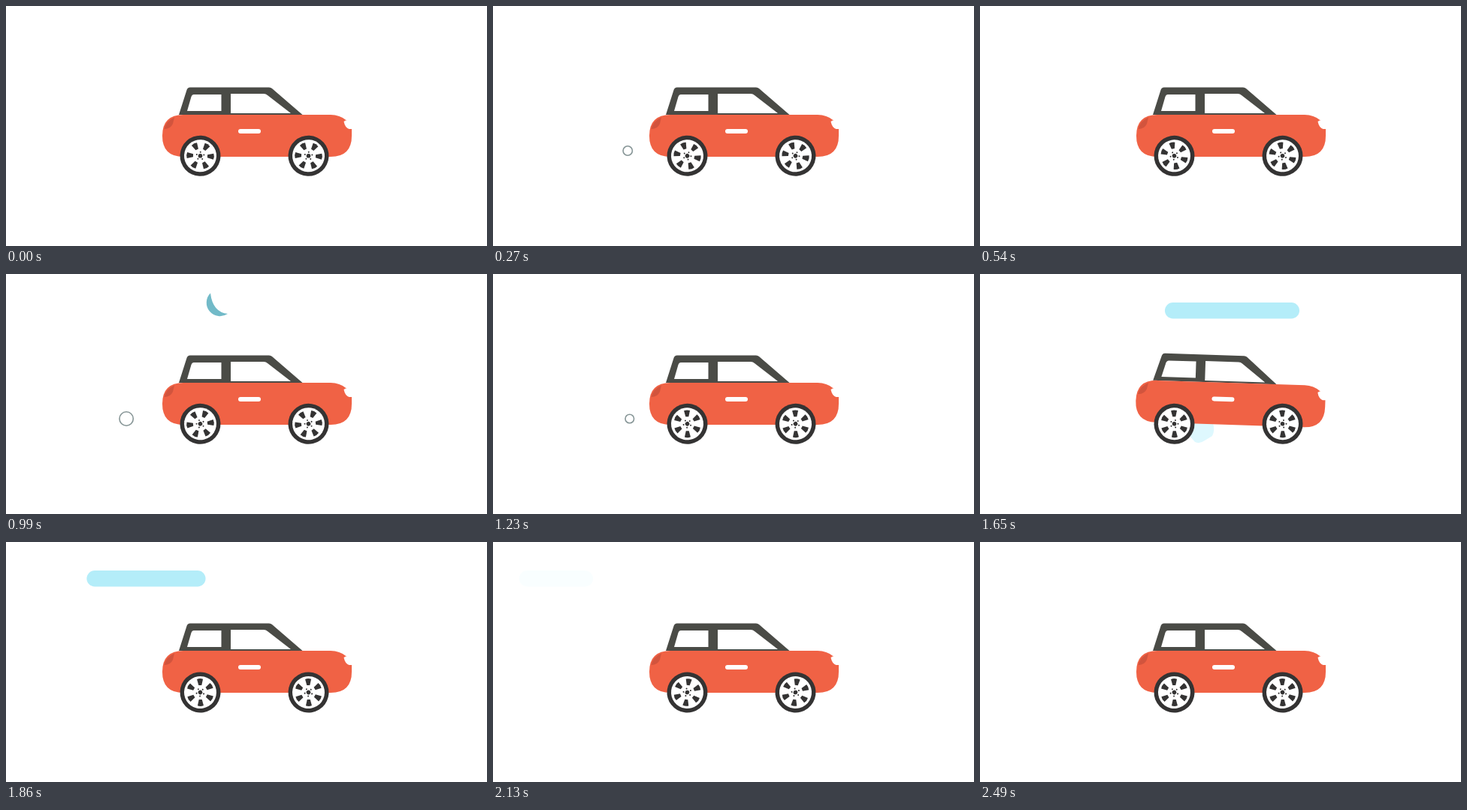
An HTML page with a canvas for the animation above (2520 ms loop, 640 by 320 pixels).

```html
<!DOCTYPE html>
<html lang="en">
<head>
<meta charset="utf-8">
<title>Car</title>
<style>
  html, body { margin: 0; width: 100%; height: 100%; overflow: hidden; background: #fff; }
  canvas { display: block; }
</style>
</head>
<body>
<canvas id="stage" width="640" height="320"></canvas>
<script>
const ctx = document.getElementById('stage').getContext('2d');
const LOOP = 2520, STEP = 30, WHEEL_TURN = 315;
const RED = '#f06245', DARK = '#4a4b46', TYRE = '#343333';

const clamp = v => Math.max(0, Math.min(1, v));
const progress = (t, from, to) => clamp((t - from) / (to - from));
const bump = (t, from, to) => Math.sin(Math.PI * progress(t, from, to));
const fade = (t, a, b, c, d) => progress(t, a, b) * (1 - progress(t, c, d));

function fill(path, color) {
  ctx.fillStyle = color;
  ctx.fill(typeof path === 'string' ? new Path2D(path) : path);
}

function disc(x, y, r, color) {
  const p = new Path2D();
  p.arc(x, y, r, 0, Math.PI * 2);
  fill(p, color);
}

function pill(x, y, w, h, color) {
  const p = new Path2D();
  p.roundRect(x, y, w, h, Math.min(w, h) / 2);
  fill(p, color);
}

function at(x, y, angle, draw) {
  ctx.save();
  ctx.translate(x, y);
  ctx.rotate(angle);
  draw();
  ctx.restore();
}

function wheel(x, y, angle) {
  at(x, y, angle, () => {
    disc(0, 0, 27, TYRE);
    disc(0, 0, 21.5, '#fff');
    for (let i = 0; i < 6; i++) {
      at(0, 0, (i + 0.5) * Math.PI / 3, () =>
        fill('M-2 -9.5L-4 -17.6Q0 -19.2 4 -17.6L2 -9.5Z', TYRE));
    }
    disc(0, 0, 2.8, TYRE);
    for (let i = 0; i < 5; i++) {
      const a = i * Math.PI * 0.4;
      disc(5 * Math.sin(a), -5 * Math.cos(a), 1, TYRE);
    }
  });
}

function body() {
  fill('M230 145L240.5 112Q241.5 108.5 245 108.5H350Q352.5 108.5 354 110L394.5 145Z', DARK);
  fill('M241 140L246.5 121Q247.5 118 250 118H286.500V140Z', '#fff');
  fill('M299 117H343Q346 117 348 119L379 143H299Z', '#fff');
  fill('M236 145H432Q444 145 453 152.500L460 164V173Q460 201 432 201H236Q208 201 208 173Q208 145 236 145Z', RED);
  fill('M224 148.500Q213 153 210.500 164Q219 164 222 157Z', '#d2543d');
  fill('M452 152.500L449.500 154Q451 162 456.500 164H462V152Z', '#fff');
  pill(309, 164, 30, 6, '#fff');
}

function puff(age) {
  if (age < 0 || age >= 1) return;
  ctx.beginPath();
  ctx.arc(206 - 46 * Math.min(1, age * 1.08), 193, 2 + 7.2 * Math.min(1, age * 1.08), 0, Math.PI * 2);
  ctx.fillStyle = '#fff';
  ctx.fill();
  ctx.strokeStyle = '#869596';
  ctx.lineWidth = 1.6;
  ctx.stroke();
}

function moon(t) {
  const p = progress(t, 660, 990);
  ctx.globalAlpha = fade(t, 660, 720, 1020, 1080);
  at(515 - 230 * p - 0.4 * Math.max(0, t - 990), 33 + 5 * p, 0, () =>
    fill('M-13 -12.500A18 18 0 0 0 10 15Q-10 13 -13 -12.500Z', '#72bac8'));
  ctx.globalAlpha = 1;
}

function cloud(t) {
  const s = t - 1470;
  if (s < 0 || s > 690) return;
  const left = 422 - 1.1246 * s + 0.000815 * s * s;
  const right = 601 - 1.0785 * s + 0.00056 * s * s;
  ctx.globalAlpha = fade(t, 1440, 1530, 1950, 2145);
  pill(left, 38, right - left, 21.5, '#b4edf9');
  ctx.globalAlpha = 1;
}

function splash(t) {
  ctx.globalAlpha = fade(t, 1530, 1620, 1680, 1770);
  at(295 - 0.4 * (t - 1650), 213, 0, () =>
    fill('M-16 -14H15Q18 -5 14 3L4 9Q-3 14 -9 11L-16 3Z', '#def8fe'));
  ctx.globalAlpha = 1;
}

function render(t) {
  ctx.clearRect(0, 0, 640, 320);
  moon(t);
  cloud(t);
  [60, 630, 1040].forEach(start => puff((t - start) / 390));
  splash(t);

  const tilt = 1.9 * bump(t, 1545, 1770) - 1.5 * bump(t, 1335, 1545);
  at(330, 150, tilt * Math.PI / 180, () => {
    ctx.translate(-330, -150);
    body();
  });

  const spin = t / WHEEL_TURN * Math.PI * 2 + 0.05;
  const ground = 199.8 + 0.7 * progress(t, 1660, 1800);
  wheel(258.5, ground - 4 * bump(t, 1500, 1650), spin);
  wheel(402.5, ground - 7.3 * bump(t, 1350, 1530), spin);
}

function tick(now) {
  render(Math.floor(now % LOOP / STEP) * STEP);
  requestAnimationFrame(tick);
}
requestAnimationFrame(tick);
</script>
</body>
</html>
```
